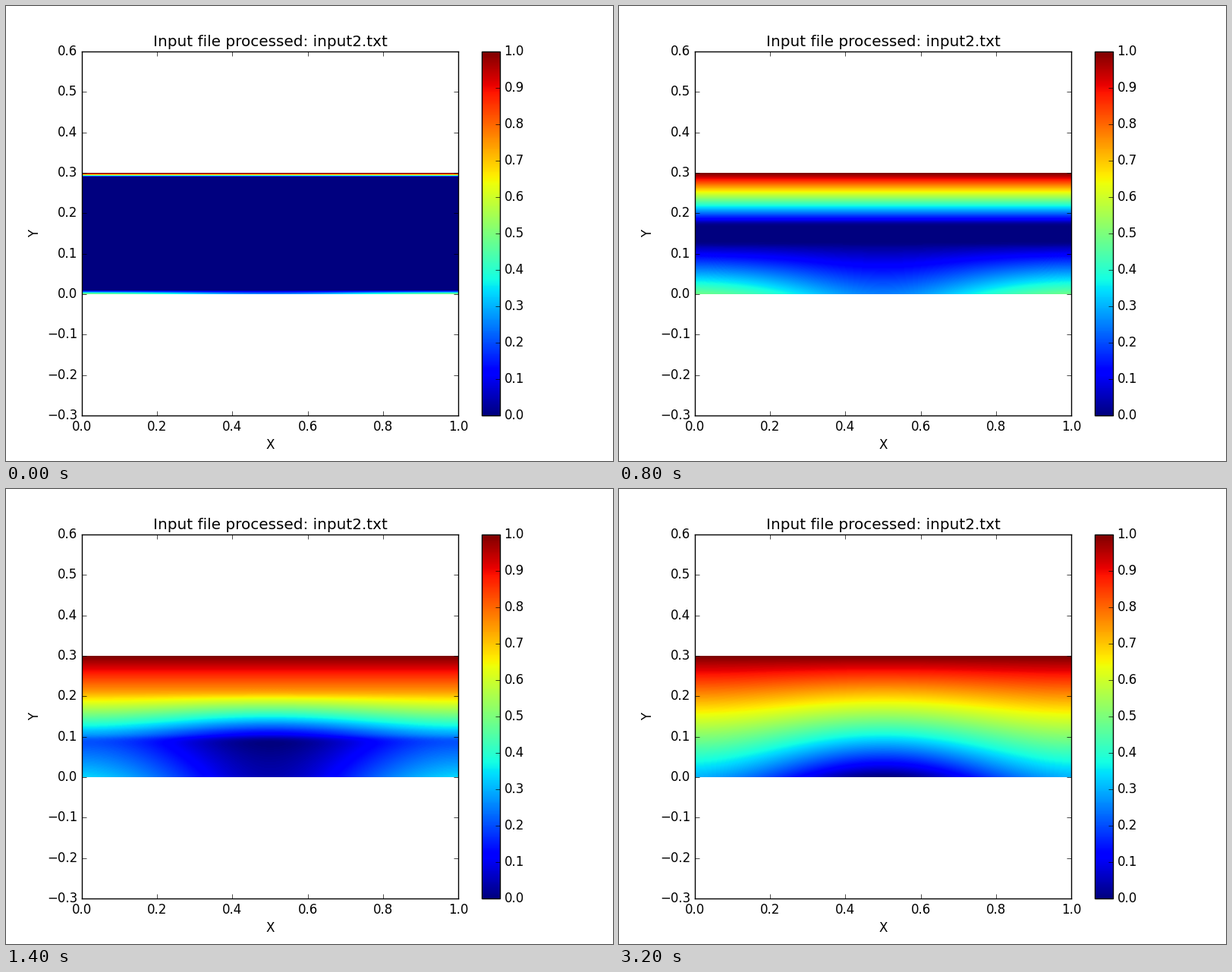
These frames come from a looping animation (800x600 px, 3400 ms). A matplotlib script:

```python
import matplotlib.pyplot as plt
import numpy as np
from matplotlib.animation import FuncAnimation

plt.style.use("classic")
plt.rcParams.update({
    "font.family": "DejaVu Sans",
    "figure.facecolor": "white",
    "savefig.dpi": 100,
})

FRAMES = 17
INTERVAL = 200
STEPS_PER_FRAME = 10
COLS, ROWS = 250, 75
LENGTH, WIDTH = 1.0, 0.3
T_COLD, T_HOT = 20.0, 80.0

x = np.arange(COLS) * LENGTH / COLS
cold_wall = T_COLD * (2 - np.exp(-10 * (x - LENGTH / 2) ** 2))
hot_wall = np.full(COLS, T_HOT)


def apply_laplacian(u):
    """Five-point stencil: periodic in x, zero outside the walls in y."""
    out = 4 * u - np.roll(u, 1, axis=1) - np.roll(u, -1, axis=1)
    out[1:] -= u[:-1]
    out[:-1] -= u[1:]
    return out


def normalized_field(u):
    """Add the walls and the periodic column, then scale to 0..1."""
    field = np.vstack([cold_wall, u, hot_wall])
    field = np.hstack([field, field[:, :1]])
    return (field - field.min()) / (field.max() - field.min())


def solve():
    """Conjugate gradient iterates, sampled at regular steps."""
    u = np.zeros((ROWS - 1, COLS))
    residual = np.zeros_like(u)
    residual[0] = cold_wall
    residual[-1] = hot_wall
    direction = residual.copy()
    rr = np.sum(residual ** 2)
    fields = []
    for step in range((FRAMES - 1) * STEPS_PER_FRAME + 1):
        a_dir = apply_laplacian(direction)
        alpha = rr / np.sum(direction * a_dir)
        u = u + alpha * direction
        residual = residual - alpha * a_dir
        rr_next = np.sum(residual ** 2)
        direction = residual + rr_next / rr * direction
        rr = rr_next
        if step % STEPS_PER_FRAME == 0:
            fields.append(normalized_field(u))
    return fields


fields = solve()

fig = plt.figure(figsize=(8, 6), dpi=100, facecolor="white")
ax = fig.add_axes([0.125, 0.1, 0.62, 0.8])
image = ax.imshow(fields[0], cmap="jet", vmin=0, vmax=1, origin="lower",
                  extent=[0, LENGTH, 0, WIDTH], aspect="auto",
                  interpolation="bilinear")
ax.set_xlim(0, 1)
ax.set_ylim(-0.3, 0.6)
ax.set_xticks(np.linspace(0, 1, 6))
ax.set_yticks(np.linspace(-0.3, 0.6, 10))
ax.set_xlabel("X")
ax.set_ylabel("Y")
ax.set_title("Input file processed: input2.txt")

bar_ax = fig.add_axes([0.78375, 0.1, 0.03, 0.8])
fig.colorbar(image, cax=bar_ax, ticks=np.linspace(0, 1, 11))


def update(frame):
    image.set_data(fields[frame])
    return [image]


anim = FuncAnimation(fig, update, frames=FRAMES, interval=INTERVAL,
                     repeat=True, repeat_delay=0, blit=False)
plt.show()
```
